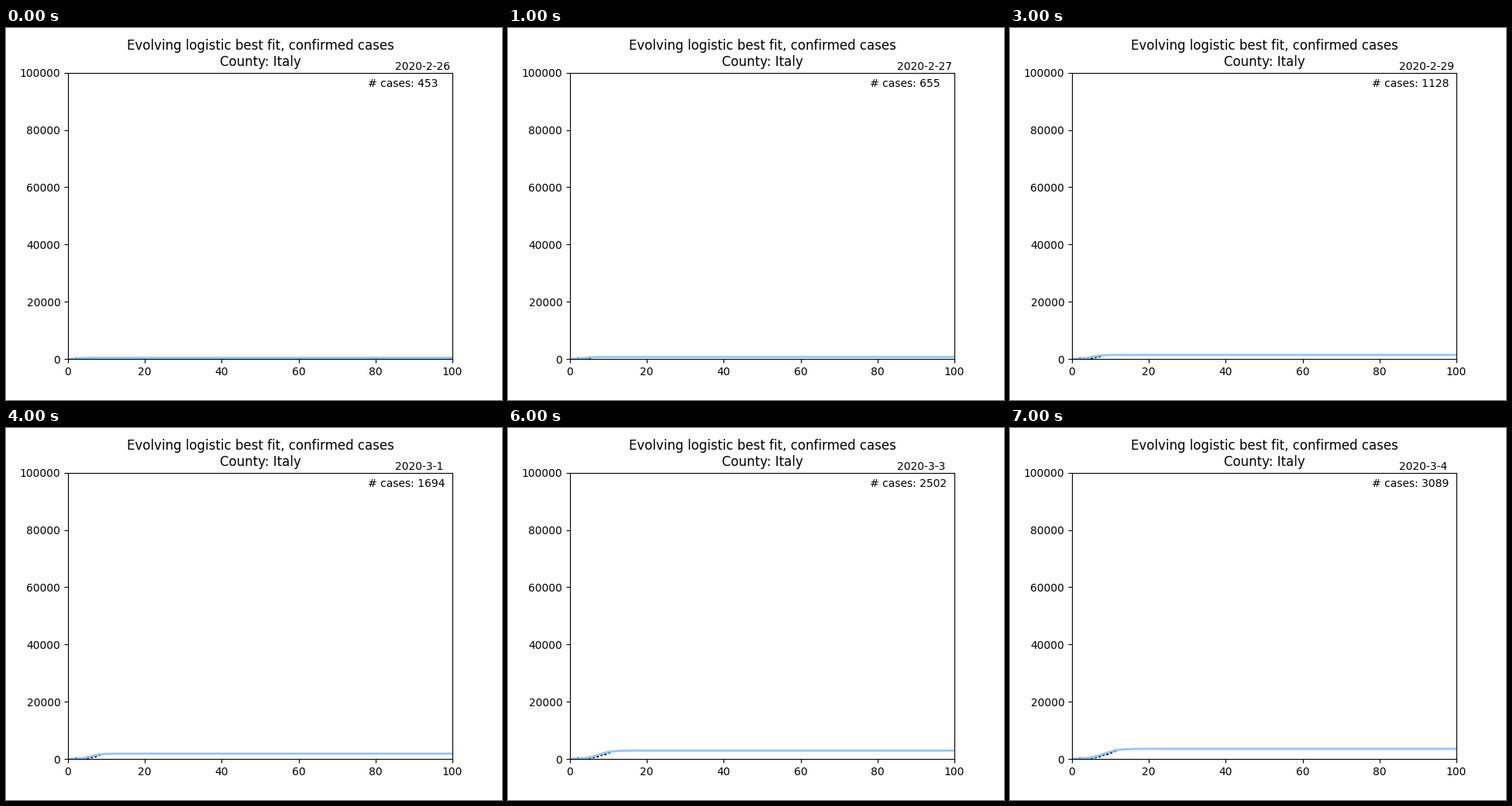
Write a matplotlib script that moves like this. It is 640 by 480 pixels and loops after 8000 ms.

```python
import numpy as np
import matplotlib.pyplot as plt
from matplotlib.animation import FuncAnimation

# confirmed cases per day, as the counter reads them
CASES = [62, 155, 229, 322, 453, 655, 888, 1128, 1694, 2036, 2502, 3089]
FIRST = 4  # day shown at the start of the loop
BLUE = "#92c6ff"


def fitted_curve(x, day):
    """Logistic whose plateau rises and whose slope eases as days pass."""
    top = 29.7 * day ** 2
    rate = 1.27 - 0.067 * day
    mid = 0.75 * day - 0.1
    return top / (1 + np.exp(-rate * (x - mid)))


def date_label(day):
    date = np.datetime64("2020-02-22") + day
    year, month, dom = str(date).split("-")
    return f"{year}-{int(month)}-{int(dom)}"


fig, ax = plt.subplots(figsize=(6.4, 4.8), dpi=100)
ax.set_xlim(0, 100)
ax.set_ylim(0, 100000)
ax.set_title("Evolving logistic best fit, confirmed cases\nCounty: Italy")

xs = np.linspace(0, 100, 501)
dots, = ax.plot([], [], "ko", ms=2.6, mew=0, zorder=1.9)
curve, = ax.plot([], [], color=BLUE, lw=2)
date_text = ax.text(85, 101000, "")
case_text = ax.text(78, 95000, "")


def update(i):
    day = FIRST + i
    dots.set_data(np.arange(day + 1), CASES[:day + 1])
    curve.set_data(xs, fitted_curve(xs, day))
    date_text.set_text(date_label(day))
    case_text.set_text(f"# cases: {CASES[day]}")
    return dots, curve, date_text, case_text


anim = FuncAnimation(fig, update, frames=len(CASES) - FIRST, interval=1000,
                     repeat=True, repeat_delay=0)
plt.show()
```
